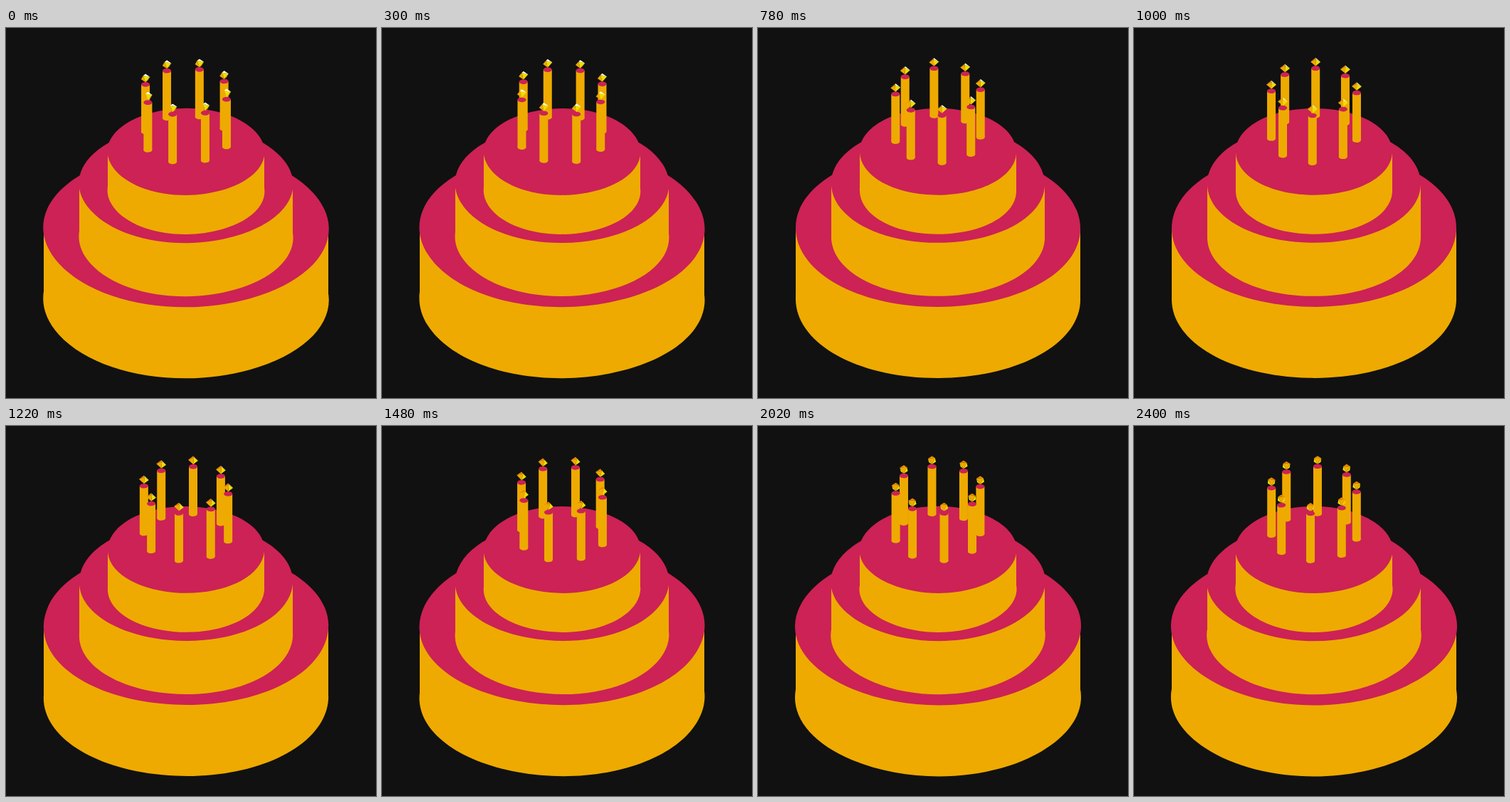
An HTML page for the animation above (2430 ms loop, 520x520 px).

```html
<!DOCTYPE html>
<html lang="en">
<head>
<meta charset="utf-8">
<title>Birthday cake</title>
<style>
html, body { margin: 0; width: 100%; height: 100%; overflow: hidden; background: #111; }
svg { display: block; width: 100vw; height: 100vh; }
</style>
</head>
<body>
<svg viewBox="0 0 520 520"></svg>
<script>
const LOOP = 2430, CX = 253;
const SIN = 0.553, COS = Math.sqrt(1 - SIN * SIN);
const GOLD = '#ea0', PINK = '#c25', YELLOW = '#ed0', WHITE = '#fff', ORANGE = '#e80';
const ARC = 9 / 16; // handle length of a quarter arc
const RAD = Math.PI / 180;

const LAYERS = [
  { r: 200, top: 281.3, h: 100 },
  { r: 150, top: 218.9, h: 75 },
  { r: 110, top: 173.9, h: 55 }
];
const CANDLE = { ring: 60, r: 6, top: 89.8, h: 66.7, flame: 9 };
const FLAME_R = 7;
// faces by side, starting between the back and right corners
const UPPER = [WHITE, YELLOW, GOLD, ORANGE];
const LOWER = [YELLOW, GOLD, YELLOW, GOLD];

const svg = document.querySelector('svg');
const pool = [];
let used = 0;

function draw(d, fill) {
  let p = pool[used];
  if (!p) {
    p = document.createElementNS('http://www.w3.org/2000/svg', 'path');
    svg.appendChild(p);
    pool.push(p);
  }
  used++;
  p.setAttribute('d', d);
  p.setAttribute('fill', fill);
}

const fmt = p => p[0].toFixed(2) + ' ' + p[1].toFixed(2);
const poly = pts => 'M' + pts.map(fmt).join('L') + 'Z';

// point on a horizontal disc: angle 0 is the back, 90 the right
function spot(x, y, r, deg) {
  const a = deg * RAD;
  return [x + r * Math.sin(a), y - r * SIN * Math.cos(a)];
}

function disc(x, y, r, turn) {
  const handle = Math.hypot(1, ARC) * r, bend = Math.atan(ARC) / RAD;
  let d = 'M' + fmt(spot(x, y, r, turn));
  for (let q = 0; q < 4; q++) {
    const a = turn + q * 90;
    d += 'C' + [spot(x, y, handle, a + bend), spot(x, y, handle, a + 90 - bend),
      spot(x, y, r, a + 90)].map(fmt).join(' ');
  }
  return d + 'Z';
}

function cylinder(x, y, r, h, turn) {
  draw(disc(x, y + h, r, turn), GOLD);
  draw(poly([[x - r, y], [x + r, y], [x + r, y + h], [x - r, y + h]]), GOLD);
  draw(disc(x, y, r, turn), PINK);
}

function flame(x, y, turn) {
  const rise = FLAME_R * COS;
  const face = (i, tip, fill) => {
    const a = spot(x, y, FLAME_R, turn + i * 90);
    const b = spot(x, y, FLAME_R, turn + i * 90 + 90);
    const c = [x, y + tip];
    const area = (b[0] - a[0]) * (c[1] - a[1]) - (b[1] - a[1]) * (c[0] - a[0]);
    if (area * tip > 0) draw(poly([a, b, c]), fill);
  };
  for (let i = 0; i < 4; i++) {
    face(i, rise, LOWER[i]);
    face(i, -rise, UPPER[i]);
  }
}

// a slow start, then a steady spin
function spin(t) {
  return t < 490 ? -26.7 + 11.4 * t / 490 : -15.3 + 0.03404 * (t - 490);
}

function render(t) {
  const turn = spin(t);
  used = 0;
  for (const l of LAYERS) cylinder(CX, l.top, l.r, l.h, turn);
  const tops = [];
  for (let i = 0; i < 8; i++) tops.push(spot(CX, CANDLE.top, CANDLE.ring, turn + i * 45));
  tops.sort((a, b) => a[1] - b[1]);
  for (const [x, y] of tops) {
    cylinder(x, y, CANDLE.r, CANDLE.h, turn);
    flame(x, y - CANDLE.flame, turn);
  }
  for (let i = used; i < pool.length; i++) pool[i].setAttribute('d', '');
}

const start = performance.now();
function tick() {
  render((performance.now() - start) % LOOP);
  requestAnimationFrame(tick);
}
tick();
</script>
</body>
</html>
```
